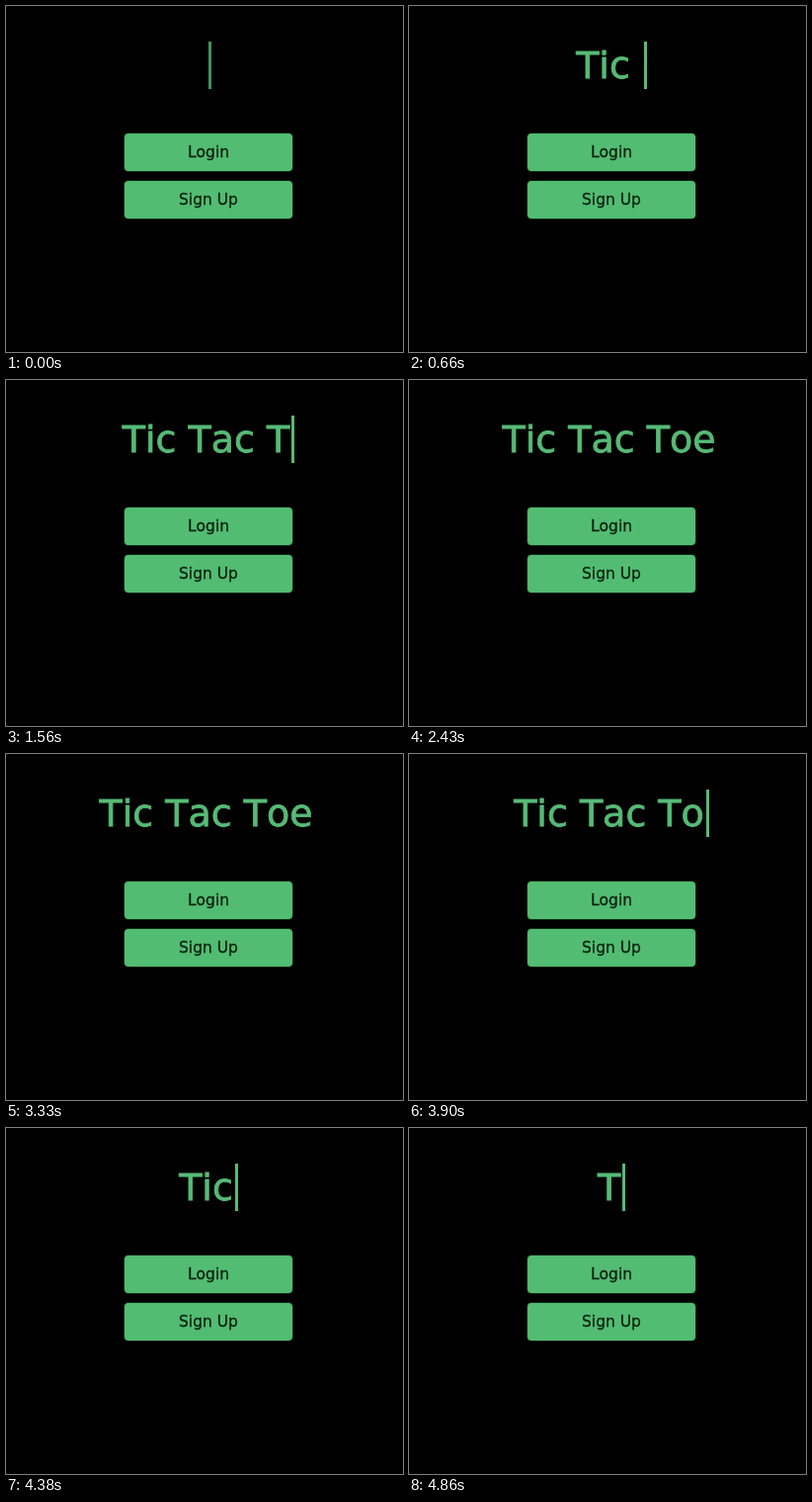
Recreate the animation shown at these times as an HTML page. Size 402 by 350 pixels, loop 4.89 s.

```html
<!DOCTYPE html>
<html lang="en">
<head>
<meta charset="utf-8">
<title>Tic Tac Toe</title>
<style>
  html, body {
    margin: 0;
    width: 100%;
    height: 100%;
    overflow: hidden;
    background: #000;
  }
  body {
    position: relative;
    font-family: "DejaVu Sans", sans-serif;
    font-kerning: none;
  }
  .title {
    position: absolute;
    left: 5px;
    top: 36px;
    width: 400px;
    height: 48px;
    display: flex;
    justify-content: center;
    font-size: 38px;
    line-height: 48px;
    color: #57ba76;
    -webkit-text-stroke: 0.8px #57ba76;
  }
  #typed { white-space: pre; }
  #caret {
    width: 3px;
    height: 48px;
    margin-left: 2px;
    background: #57ba76;
  }
  .button {
    position: absolute;
    left: 120px;
    width: 170px;
    height: 38px;
    border-radius: 4px;
    background: #52bc72;
    box-shadow: 0 0 0 1px #0c2a10;
    font-size: 15.5px;
    line-height: 38px;
    text-align: center;
    color: #0a2010;
    -webkit-text-stroke: 0.3px #0a2010;
  }
</style>
</head>
<body>
<div class="title"><span id="typed"></span><span id="caret"></span></div>
<div class="button" style="top:129px">Login</div>
<div class="button" style="top:177px">Sign Up</div>
<script>
  const LOOP = 4890, TICK = 30;
  const TEXT = "Tic Tac Toe";
  const TYPE_TIMES = [90, 270, 450, 660, 840, 1020, 1200, 1380, 1560, 1740, 1920];
  const ERASE_START = 3900, ERASE_STEP = 68, RETYPE = 4860;

  // The caret jumps to full and fades out from each start until the next key stroke.
  const FADE = 330;
  const FADES = [
    { start: -70, end: 90 },
    { start: 2100, end: 3000 },
    { start: 3000, end: ERASE_START },
    { start: 4700, end: RETYPE },
  ];

  const typed = document.getElementById("typed");
  const caret = document.getElementById("caret");

  function letterCount(t) {
    if (t >= RETYPE) return 1;
    if (t >= ERASE_START) {
      const erased = Math.floor((t - ERASE_START) / ERASE_STEP) + 1;
      return Math.max(0, TEXT.length - erased);
    }
    return TYPE_TIMES.filter(time => time <= t).length;
  }

  function caretOpacity(t) {
    const fade = FADES.find(({ start, end }) => t >= start && t < end);
    return fade ? Math.max(0, 1 - (t - fade.start) / FADE) : 1;
  }

  function draw(t) {
    typed.textContent = TEXT.slice(0, letterCount(t));
    caret.style.opacity = caretOpacity(t);
  }

  const origin = performance.now();
  function frame() {
    const t = (performance.now() - origin) % LOOP;
    draw(Math.floor(t / TICK) * TICK);
    requestAnimationFrame(frame);
  }
  frame();
</script>
</body>
</html>
```
